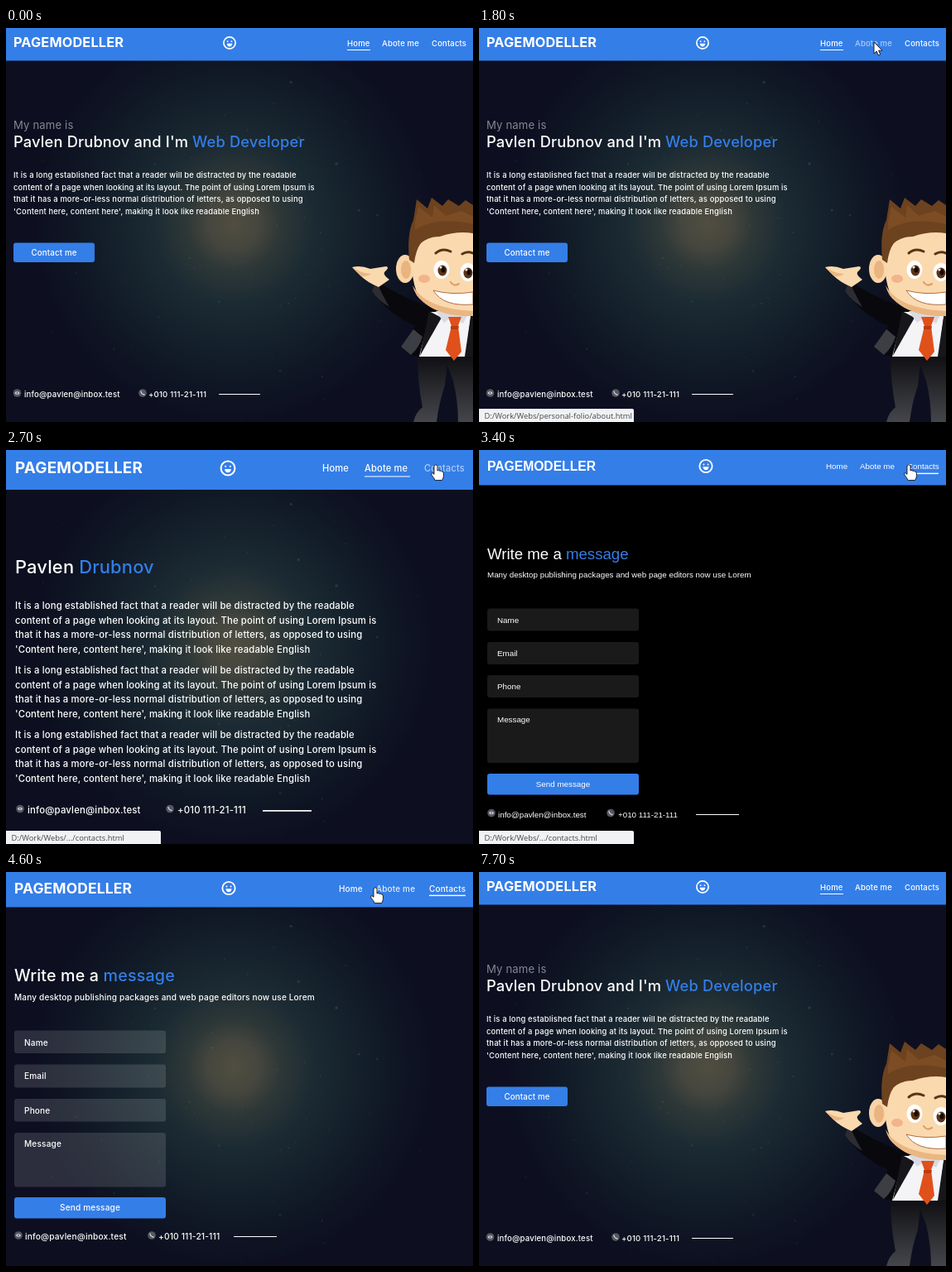
Recreate the animation shown at these times as an HTML page. Size 564x476 px, loop 8000 ms.

```html
<!DOCTYPE html>
<html lang="en">
<head>
<meta charset="utf-8">
<title>Portfolio tour</title>
<style>
  html, body { margin: 0; width: 100%; height: 100%; overflow: hidden; background: #0d0f20; }
  svg { display: block; width: 564px; height: 476px; }
  text { fill: #fff; white-space: pre; }
  .web { font-family: Inter, sans-serif; font-weight: 500; letter-spacing: .01em; }
  .plain { font-family: "Liberation Sans", Arial, sans-serif; }
  .status { font-family: "Open Sans", sans-serif; }
  .blue { fill: #347ee8; }
  .logo { font-weight: 700; }
  .thin { font-weight: 400; fill: #85868f; }
  .mid { text-anchor: middle; }
</style>
</head>
<body>
<svg id="stage" viewBox="0 0 564 476"></svg>
<script>
const stage = document.getElementById('stage');
const LOOP = 8000;

const text = (x, y, size, str, cls = '') =>
  `<text x="${x}" y="${y}" font-size="${size}" class="${cls}">${str}</text>`;
const rect = (x, y, w, h, fill, rx = 0) =>
  `<rect x="${x}" y="${y}" width="${w}" height="${h}" rx="${rx}" fill="${fill}"/>`;
const dot = (x, y, rx, fill, ry = rx, extra = '') =>
  `<ellipse cx="${x}" cy="${y}" rx="${rx}" ry="${ry}" fill="${fill}" ${extra}/>`;
const path = (d, fill, extra = '') => `<path d="${d}" fill="${fill}" ${extra}/>`;
const stroke = (d, color, width) =>
  path(d, 'none', `stroke="${color}" stroke-width="${width}" stroke-linecap="round"`);
const lines = (x, y, step, size, list) =>
  list.map((s, i) => text(x, y + i * step, size, s)).join('');

function galaxy() {
  let seed = 11;
  const rnd = () => (seed = seed * 16807 % 2147483647) / 2147483647;
  let out = rect(0, 0, 564, 476, '#0d0f20') + rect(0, 0, 564, 476, 'url(#glow)');
  for (let i = 0; i < 230; i++) {
    const a = rnd() * 6.283, r = 30 + 230 * rnd();
    const alpha = (0.04 + 0.14 * rnd() ** 3).toFixed(3);
    out += dot((275 + r * Math.cos(a)).toFixed(1), (236 + r * Math.sin(a)).toFixed(1),
      (0.5 + 1.3 * rnd() ** 3).toFixed(2), `rgba(150,170,160,${alpha})`);
  }
  return out;
}

function smiley([x, y, r]) {
  return `<g transform="translate(${x} ${y}) scale(${r / 8})">`
    + dot(0, 0, 7.1, 'none', 7.1, 'stroke="#fff" stroke-width="1.7"')
    + dot(-2.4, -1.8, 0.9, '#fff') + dot(2.4, -1.8, 0.9, '#fff')
    + path('M-3.3 .8H3.3Q2.9 4.4 0 4.4T-3.3 .8Z', '#fff') + '</g>';
}

function footer({ icons, iconY, texts, y, size, rule, ruleY, weight = 1 }) {
  const [mail, phone] = icons;
  return dot(mail, iconY, 4.8, '#555862') + dot(mail, iconY, 2.8, '#d6d7da', 1.7)
    + dot(mail, iconY, 1, '#555862')
    + dot(phone, iconY, 4.8, '#555862')
    + stroke(`M${phone - 2} ${iconY - 2}q.4 3.4 4 4`, '#d6d7da', 1.3)
    + text(texts[0], y, size, 'info@pavlen@inbox.test')
    + text(texts[1], y, size, '+010 111-21-111')
    + rect(rule[0], ruleY, rule[1] - rule[0], weight, '#fff');
}

function page(id, font, p, body) {
  const [from, to, barY, bar = 1] = p.underline;
  return `<g id="${id}" class="${font}">` + rect(0, 0, 564, p.head, '#347ee8')
    + text(...p.logo, 'PAGEMODELLER', 'logo') + smiley(p.face)
    + ['Home', 'Abote me', 'Contacts'].map((s, i) =>
        text(p.nav[i], p.navY, p.navSize, s, 'nav' + i)).join('')
    + rect(from, barY, to - from, bar, '#fff') + body + footer(p.foot) + '</g>';
}

const webCopy = [
  'It is a long established fact that a reader will be distracted by the readable',
  'content of a page when looking at its layout. The point of using Lorem Ipsum is',
  'that it has a more-or-less normal distribution of letters, as opposed to using',
  "'Content here, content here', making it look like readable English"];
const plainCopy = [
  'It is a long established fact that a reader will be distracted by the readable content of a',
  'page when looking at its layout. The point of using Lorem Ipsum is that it has a more-or-',
  "less normal distribution of letters, as opposed to using 'Content here, content here',",
  'making it look like readable English'];

const businessman = () =>
  // trousers, jacket and raised arm
  path('M497 394H534L530 432Q523 452 520 476H492Q495 464 503 458Q497 428 497 394Z', 'url(#cloth)')
  + path('M528 394H564V476H546Q546 450 540 426Z', 'url(#cloth)')
  + path('M447 305Q470 321 505 335L564 342V397H499L489 395L477 385Q486 374 494 360Q461 345 442 318Z', '#09090d')
  + path('M447 305L442 318Q450 330 463 337Q453 320 447 305Z', '#2c2d32')
  + path('M492 364L477 385L489 395Q499 386 503 373Z', '#3d3e44')
  + path('M418 289Q428 286 440 291L459 288Q464 289 457 295Q455 298 463 304L450 313Q436 307 429 300Z', '#fbd9af')
  + path('M418 289Q428 296 441 297Q434 302 428 299Z', '#eab682')
  // shirt and tie
  + path('M513 343H562L555 397H499Z', '#f4f3f6')
  + path('M511 342L500 396L526 350Z', '#17171b')
  + path('M562 343L554 397H564V342Z', '#17171b')
  + path('M519 342L529 356L539 349L552 357L560 342Z', '#d9dae2')
  + path('M534 349H550L546 360L550 391L541 402L531 389L538 360Z', '#e0501b')
  + path('M537 360H547L546 364H537Z', '#b93d11')
  // head
  + dot(482, 291, 11, '#f8d4a8', 17) + dot(483, 292, 6, '#e9b47f', 11)
  + path('M490 256Q520 240 564 244V347Q526 349 504 331Q487 316 490 256Z', '#fbd9af')
  + path('M491 311Q506 339 564 342V348Q525 349 504 331Q494 324 491 311Z', '#eab682')
  + dot(505, 303, 7, '#f2b48c', 5)
  + path('M487 280Q484 248 492 232L496 207L509 218L514 205L527 215L534 207L547 215L555 208L564 214V248Q544 245 524 252Q510 252 501 260Q495 268 493 284Z', '#6d421f')
  + path('M494 234L498 216L515 229L517 214L531 227L550 221L564 228V237Q520 227 494 244Z', '#7c4d25')
  + dot(526, 292, 9.5, '#fff', 11) + dot(558, 295, 9.5, '#fff', 11)
  + dot(527, 293, 5.5, '#5d3415', 6.5) + dot(558, 296, 5.5, '#5d3415', 6.5)
  + dot(528, 292, 2.6, '#160b06', 3.5) + dot(559, 295, 2.6, '#160b06', 3.5)
  + dot(525, 289, 1.5, '#fff') + dot(556, 292, 1.5, '#fff')
  + stroke('M519 272Q527 265 537 270', '#5a3417', 3) + stroke('M551 273Q557 269 564 272', '#5a3417', 3)
  + stroke('M537 307Q541 313 547 309', '#dda068', 2.2)
  + path('M516 317Q538 323 564 319V334Q528 337 516 317Z', '#fff', 'stroke="#b06d42" stroke-width="1"');

const home = page('home', 'web', {
  head: 39.5, logo: [9, 23.4, 16.3], face: [270, 18, 8],
  nav: [412, 454, 514], navY: 22.3, navSize: 9.5, underline: [412, 440, 26],
  foot: { icons: [13.5, 165], iconY: 441, texts: [22, 172], y: 445.7, size: 9.6, rule: [257, 307], ruleY: 442 }
}, businessman()
  + text(9, 122, 13.1, 'My name is', 'thin')
  + text(9, 144, 18.3, "Pavlen Drubnov and I'm") + text(225, 144, 18.3, 'Web Developer', 'blue')
  + lines(9, 180.8, 14.75, 9.37, webCopy)
  + rect(9, 259.5, 98, 23.5, '#347ee8', 3) + text(58, 274.8, 9.7, 'Contact me', 'mid'));

const aboutBody = (size, copySize, copy) =>
  text(11, 149, size, 'Pavlen <tspan class="blue">Drubnov</tspan>')
  + [192, 270, 348].map(y => lines(11, y, 17.7, copySize, copy)).join('');

const aboutPlain = page('aboutPlain', 'plain', {
  head: 48, logo: [11, 28.3, 17.65], face: [273, 22, 9.5],
  nav: [401, 446, 510], navY: 26, navSize: 11, underline: [446, 494, 31.5],
  foot: { icons: [17, 179.5], iconY: 433.5, texts: [26, 188], y: 439, size: 11, rule: [295, 354], ruleY: 435, weight: 1.7 }
}, aboutBody(21.1, 11.04, plainCopy));

const about = page('about', 'web', {
  head: 48, logo: [11, 28.3, 18.9], face: [268, 22, 9.5],
  nav: [382, 433, 505], navY: 26.3, navSize: 11.1, underline: [433, 488, 31.5],
  foot: { icons: [17, 198], iconY: 433.5, texts: [26, 207], y: 439, size: 11.4, rule: [310, 369], ruleY: 435, weight: 1.7 }
}, aboutBody(21.9, 11.3, webCopy));

// Field rows: top, height and label baseline.
const form = (rows, buttonY, fill, size) =>
  ['Name', 'Email', 'Phone', 'Message'].map((s, i) =>
    rect(10, rows[i][0], 183, rows[i][1], fill, 3) + text(22, rows[i][2], size, s)).join('')
  + rect(10, buttonY, 183, 25.5, '#347ee8', 3)
  + text(101.5, buttonY + 16, size, 'Send message', 'mid');

const contactTitle = (y, size, subY, subSize) =>
  text(10, y, size, 'Write me a <tspan class="blue">message</tspan>')
  + text(10, subY, subSize, 'Many desktop publishing packages and web page editors now use Lorem');

const contactsPlain = page('contactsPlain', 'plain', {
  head: 42.5, logo: [10, 24.5, 15.65], face: [274, 19.5, 8.6],
  nav: [419, 460, 517], navY: 23.3, navSize: 9.81, underline: [517, 555, 27.7, 1.4],
  foot: { icons: [15, 159], iconY: 438.5, texts: [23, 168], y: 443.6, size: 9.81, rule: [262, 314], ruleY: 440 }
}, contactTitle(131.6, 18.65, 154, 9.81)
  + form([[191.5, 27, 208.5], [232, 27, 248.8], [272, 27, 288.8], [312.5, 65.5, 328.8]], 391, '#1a1a1a', 9.81));

const contacts = page('contacts', 'web', {
  head: 42.5, logo: [10, 25.5, 17.4], face: [269, 19.5, 8.6],
  nav: [402, 447, 511], navY: 24, navSize: 10, underline: [511, 555, 27.7, 1.4],
  foot: { icons: [15, 176], iconY: 439, texts: [23, 184], y: 444.3, size: 10.2, rule: [275, 327], ruleY: 440 }
}, contactTitle(132, 19.7, 154.8, 10.05)
  + form([[191.5, 27.5, 209.6], [232.5, 28, 250.3], [274, 27.5, 291.6], [315, 65.5, 331.8]], 393, 'rgba(255,255,255,.13)', 10.1));

stage.innerHTML = `<defs><radialGradient id="glow" gradientUnits="userSpaceOnUse" cx="275" cy="236" r="240">
  <stop offset="0" stop-color="#514e40"/><stop offset=".13" stop-color="#45463e"/>
  <stop offset=".24" stop-color="#2d3737"/><stop offset=".4" stop-color="#1c2b33"/>
  <stop offset=".62" stop-color="#14202b"/><stop offset=".82" stop-color="#0f1624"/>
  <stop offset="1" stop-color="#0d0f20"/></radialGradient>
  <linearGradient id="cloth" gradientUnits="userSpaceOnUse" x1="0" y1="400" x2="0" y2="476">
  <stop offset="0" stop-color="#121216"/><stop offset="1" stop-color="#45464b"/></linearGradient></defs>`
  + `<g id="galaxy">${galaxy()}</g><g id="black">${rect(0, 0, 564, 476, '#000')}</g>`
  + home + aboutPlain + about + contactsPlain + contacts
  + '<g id="status" class="status">' + rect(-3, 460, 190, 19, '#f1f2f3', 2)
  + '<text id="url" x="6.5" y="472" font-size="9.36" style="fill:#45474b"></text></g>'
  + '<g id="cursor" stroke="#111" stroke-width=".9" stroke-linejoin="round">'
  + path('M0 0V14L3.2 11L5.3 16L7.7 15L5.6 10.2H10Z', '#fff', 'id="arrow"')
  + path('M-2 1Q0-1.6 2 1V7Q4 5.7 5 7.4Q7 6.4 7.6 8.2Q9.4 7.7 9.4 10V13.5Q9.4 16 7.6 18.6H-.8Q-2 15.6-5.2 12Q-6.2 9.6-4 9.7L-2 11.4Z', '#fff', 'id="hand"')
  + '</g>';

const get = id => document.getElementById(id);
const show = (id, on) => { get(id).style.display = on ? '' : 'none'; };
// Last entry whose start time has passed.
const at = (list, t) => list.filter(e => e[0] <= t).pop();

const pages = [[0, 'home'], [2000, 'aboutPlain'], [2100, 'about'],
  [3400, 'contactsPlain'], [3500, 'contacts'], [5300, 'home']];
const pageIds = ['home', 'aboutPlain', 'about', 'contactsPlain', 'contacts'];
const hovers = [[0, -1], [1200, 1], [2000, -1], [2500, 2], [3400, -1], [4600, 1], [4800, 0], [5300, -1]];
const pointers = [[0, 'arrow'], [1200, 'hand'], [1700, 'arrow'], [2500, 'hand'], [6600, 'arrow']];
const urls = [[0, ''], [1200, 'personal-folio/about.html'], [2600, '.../contacts.html'],
  [3900, ''], [4900, '.../index.html'], [5800, '']];
const route = [[100, 480, 440], [300, 455, 340], [600, 455, 340], [1300, 472, 18], [1700, 472, 18],
  [1800, 477, 17], [2000, 498, 16], [2500, 519, 18], [4400, 519, 18], [4600, 446, 19],
  [5000, 424, 21], [6500, 424, 21], [7300, 472, 368], [7700, 408, 480]];

function position(t) {
  const i = route.findIndex(k => k[0] > t);
  const [a, b] = [route[i - 1], route[i]];
  const u = (t - a[0]) / (b[0] - a[0]), e = u * u * (3 - 2 * u);
  return [a[1] + (b[1] - a[1]) * e, a[2] + (b[2] - a[2]) * e];
}

function draw(now) {
  const t = Math.floor(now % LOOP / 100) * 100;
  const current = at(pages, t)[1], [since, hover] = at(hovers, t);
  const pointer = at(pointers, t)[1], url = at(urls, t)[1];
  const faded = 1 - 0.4 * Math.min(1, (t - since + 100) / 300);
  pageIds.forEach(id => show(id, id === current));
  show('black', current === 'contactsPlain');
  for (let i = 0; i < 3; i++)
    get(current).querySelector('.nav' + i).style.opacity = i === hover ? faded : 1;
  show('status', url);
  get('url').textContent = 'D:/Work/Webs/' + url;
  const visible = t >= 100 && t < 7700;
  show('cursor', visible);
  if (visible) get('cursor').setAttribute('transform', `translate(${position(t)})`);
  show('arrow', pointer === 'arrow');
  show('hand', pointer === 'hand');
  requestAnimationFrame(() => draw(performance.now()));
}
draw(performance.now());
</script>
</body>
</html>
```
